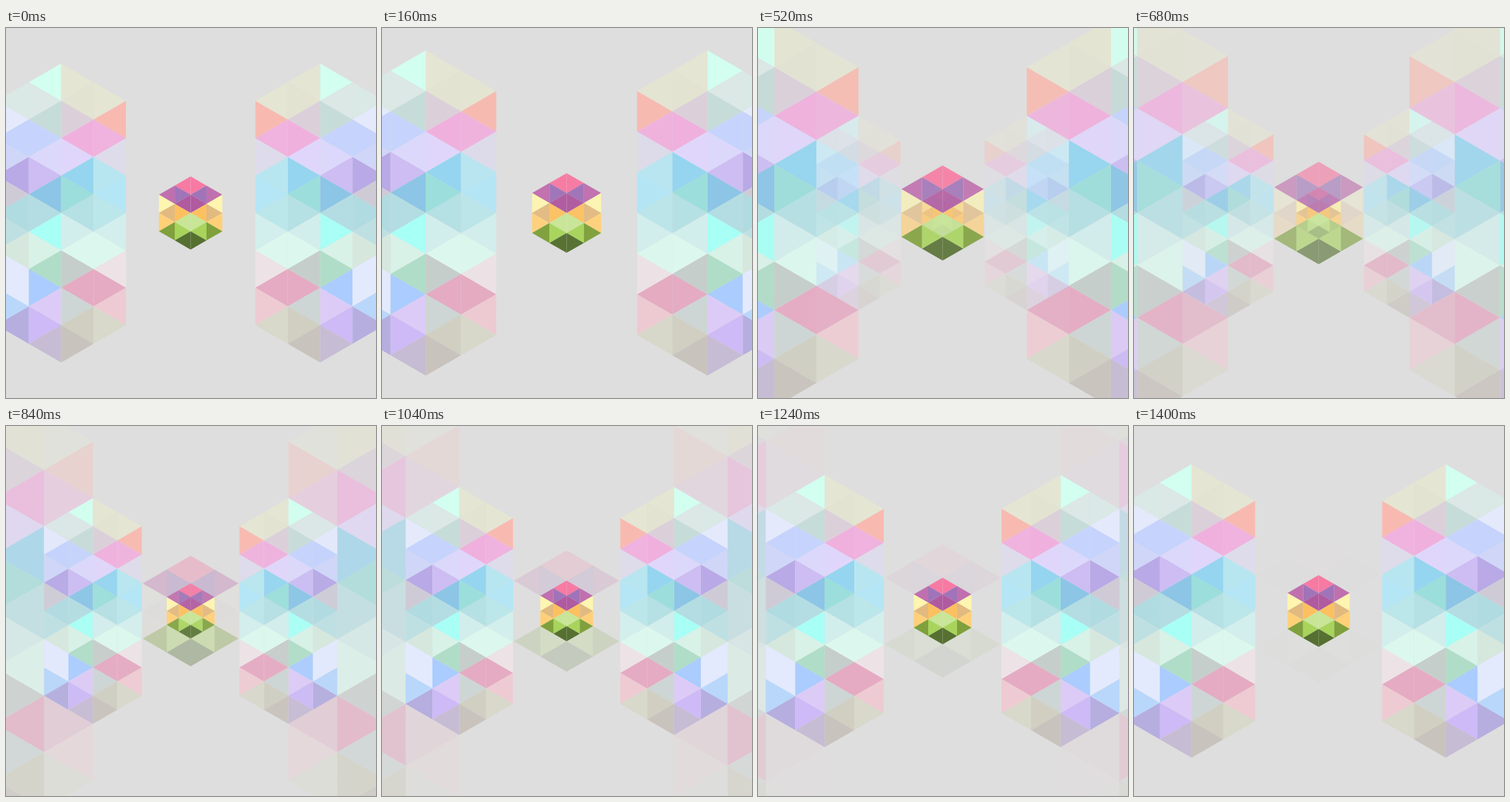
An HTML page with a canvas for the animation above (1440 ms loop, 500x500 px).

```html
<!DOCTYPE html>
<html lang="en">
<head>
<meta charset="utf-8">
<title>Hexagon zoom</title>
<style>
  html, body { margin: 0; height: 100%; overflow: hidden; background: #dedede; }
  canvas { display: block; }
</style>
</head>
<body>
<canvas id="stage" width="500" height="500"></canvas>
<script>
const ctx = document.getElementById('stage').getContext('2d');
const LOOP = 1440, STEP = 40, CX = 249.5, CY = 250, UNIT = 50.5;
const COL = Math.sqrt(3) / 2;
const list = text => text.trim().split(/\s+/).map(c => '#' + c);

// Triangle colours of each column, top to bottom.
const gemInner = list('f77aa3 a074b8 b05aa0 fcc060 c8e696 a8d45c 557030');
const gemOuter = list('c070ae fdf5b0 e2ba80 ffd078 7fa03c');
const sideColumns = [
  list('dae8e6 e4eafc c5d3fd d0d6f8 b9a9e6 cfcbd6 b0dbe0 bfe0e3 d6e8de e3eafd e3eafd b9d7fb b5aedf'),
  list('d2fff0 dbe8e6 c6dcd9 c6d4fd dcd8fb cdbdf3 8cc5e6 b3dde2 a8fff5 d8f2e8 b0ddc8 aaccff dccbf6 cdbaf6 c6bcd4'),
  list('e5e5d3 e3e3d2 dbd0da f0b0de e0d6fb 95d5f0 9cdedb b5e0e4 d2eeec dcf8ee c6cecb e5abc2 cdd6d4 d0cfc2 c9c3bd'),
  list('e5e5d3 f8bab0 f0b2de dedbeb b8e6f0 b4e6f6 bbe6ea d3efed dcf8ee ede3e6 e5abc2 eecbd3 d8d8cb')
];

const fadeIn = [[0, 0], [.15, 0], [.24, .12], [.38, .4], [.59, .96], [.68, 1], [1, 1]];
const fadeOut = [[0, 1], [.24, .97], [.38, .88], [.59, .35], [.73, .18], [.86, .08], [1, 0]];

function curve(keys, x) {
  const i = Math.max(1, keys.findIndex(k => k[0] >= x));
  const [x0, y0] = keys[i - 1], [x1, y1] = keys[i];
  return y0 + (y1 - y0) * (x - x0) / (x1 - x0);
}

// One column of alternating triangles; dir points away from the tile centre.
function column(colors, x, dir, size, alphaAt) {
  const near = x, far = x + dir * COL * size;
  colors.forEach((color, i) => {
    const y = CY + (i - (colors.length - 1) / 2) / 2 * size;
    const [base, apex] = i % 2 ? [far, near] : [near, far];
    ctx.globalAlpha = alphaAt(i);
    ctx.fillStyle = color;
    ctx.beginPath();
    ctx.moveTo(base, y - size / 2);
    ctx.lineTo(base, y + size / 2);
    ctx.lineTo(apex, y);
    ctx.fill();
  });
}

function gem(size, alpha, growing) {
  const early = growing ? alpha : alpha ** 3;
  const late = growing ? alpha ** 3 : alpha;
  for (const dir of [-1, 1]) {
    column(gemInner, CX, dir, size, i => i === 3 || (growing && i === 4) ? early : late);
    column(gemOuter, CX + dir * COL * size, dir, size, i => i > 0 && i < 4 ? early : late);
  }
}

function sides(size, alpha, growing) {
  const w = COL * size;
  for (const side of [-1, 1]) {
    sideColumns.forEach((colors, n) => {
      const a = growing || n === 3 ? alpha : alpha ** .4;
      const inward = n > 1 ? -side : side;
      const offset = n === 0 || n === 3 ? w : 0;
      column(colors, CX + side * 4 * w + inward * offset, inward, size, () => a);
    });
  }
}

function draw(now) {
  const step = Math.floor(now % LOOP / STEP);
  const p = (step + Math.min(1, step / 8)) / 37;
  const size = UNIT * 2 ** p;
  const appear = curve(fadeIn, p), vanish = curve(fadeOut, p);

  ctx.globalAlpha = 1;
  ctx.fillStyle = '#dedede';
  ctx.fillRect(0, 0, 500, 500);
  sides(size, vanish, false);
  sides(size / 2, appear, true);
  gem(size * .49, vanish, false);
  gem(size * .245, appear, true);
}

const start = performance.now();
function tick() {
  draw(performance.now() - start);
  requestAnimationFrame(tick);
}
tick();
</script>
</body>
</html>
```
